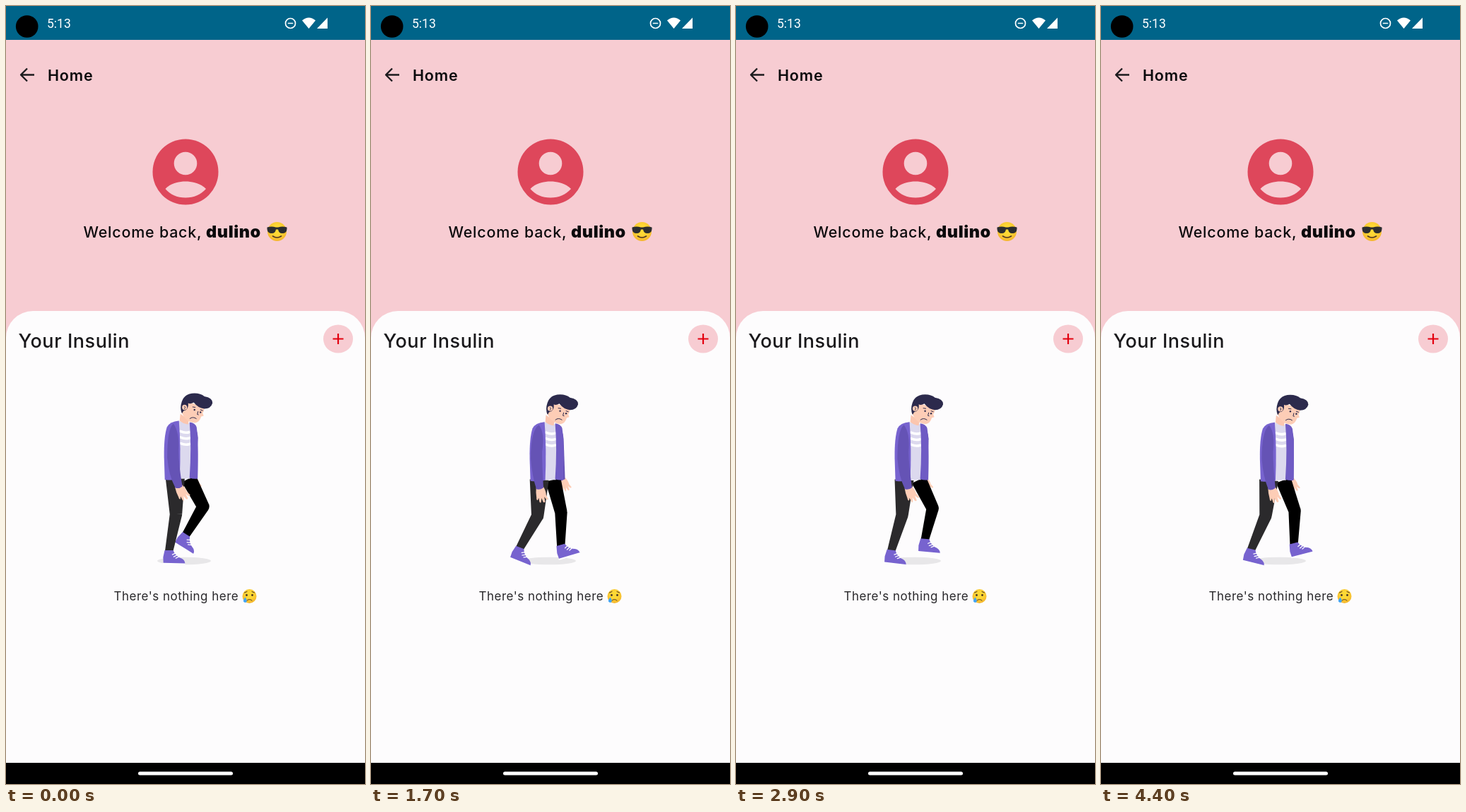
An HTML page that plays this animation: 508x1102 px, repeating every 4.5 s.

```html
<!DOCTYPE html>
<html lang="en">
<head>
<meta charset="utf-8">
<title>Home</title>
<style>
  html, body { margin: 0; width: 100%; height: 100%; overflow: hidden; background: #fdfcfd; }
  svg { display: block; width: 100vw; height: 100vh; }
  text { font-family: Inter, "Open Sans", sans-serif; fill: #0b0a0c; }
  .skin { fill: #fdcdb6; }
  .line { fill: none; stroke-linecap: round; stroke-linejoin: round; }
</style>
</head>
<body>
<svg viewBox="0 0 508 1102">
  <defs>
    <radialGradient id="face" cx=".5" cy=".4" r=".6">
      <stop offset=".4" stop-color="#fdd835"/>
      <stop offset="1" stop-color="#f5b52e"/>
    </radialGradient>
    <g id="shoe">
      <path fill="#7763cf" d="M-6-2H6Q9 5 15 8Q22 10 23 15V17H-7.5L-8 8Z"/>
      <path class="line" stroke="#fff" stroke-width="2" d="M-7.5 17H22.5"/>
      <path class="line" stroke="#fff" stroke-width="1.3" d="M5 4L9 2M7 7L11 5M10 9L14 7"/>
    </g>
    <path id="hand" class="skin" d="M-5-2H5Q8 6 7 11L9 17Q8 19 6 17L4 13L4 20Q2 22 1 19L0 14L-2 20Q-4 21-4 18L-4 13L-6 16Q-8 16-7 12Q-7 5-5-2Z"/>
  </defs>

  <!-- status bar -->
  <rect width="508" height="48" fill="#006489"/>
  <circle cx="29.7" cy="29" r="15.8"/>
  <text x="58" y="31" style="font:17.5px Roboto,sans-serif;fill:#fff">5:13</text>
  <g fill="#fff">
    <path class="line" stroke="#fff" stroke-width="1.7" d="M395.5 24.5a7 7 0 1 0 14 0a7 7 0 1 0-14 0M399.5 24.5H405.5"/>
    <path d="M428.5 32L419 20.5Q428.5 12.5 438 20.5ZM440 32H455V16.5Z"/>
  </g>

  <!-- header -->
  <rect y="48" width="508" height="425" fill="#f7ccd2"/>
  <path class="line" stroke="#1c1a1d" stroke-width="2.3" style="stroke-linecap:butt" d="M40 97.5H21.5M30 88.5L21 97.5L30 106.5"/>
  <text x="59" y="106" font-size="21.5" font-weight="600" letter-spacing=".8">Home</text>
  <circle cx="254" cy="235" r="46.5" fill="#de475b"/>
  <g fill="#f7ccd2">
    <circle cx="254" cy="223" r="16.3"/>
    <path d="M225.5 259C233 251 244 248.5 254 248.5S275 251 283 259C276 267 266 271.5 254 271.5S232 267 225.5 259Z"/>
  </g>
  <text x="109.5" y="328" font-size="21.5" font-weight="550" letter-spacing=".75">Welcome back,</text>
  <text x="283" y="328" font-size="23.5" font-weight="900" letter-spacing=".6">dulino</text>
  <g>
    <circle cx="383.5" cy="319.5" r="13.5" fill="url(#face)"/>
    <path fill="#2b2d30" d="M369.5 313.5Q376 311.5 382 313.5H385Q391 311.5 397.5 313.5V316Q397 322 391 322Q386 322 385 316.5H382Q381 322 376 322Q370 322 369.5 316Z"/>
    <path class="line" stroke="#4b3425" stroke-width="1.6" d="M377.5 326Q383.5 330 389.5 326"/>
  </g>

  <!-- sheet -->
  <path fill="#fdfcfd" d="M0 1072V470A38 38 0 0 1 38 432H470A38 38 0 0 1 508 470V1072Z"/>
  <text x="17.5" y="484" font-size="27" font-weight="500" letter-spacing=".55" style="fill:#19181b">Your Insulin</text>
  <ellipse cx="470" cy="471.5" rx="21" ry="20" fill="#f7ccd2"/>
  <path stroke="#e3000f" stroke-width="2.2" d="M462.5 471.5H477.5M470 464V479"/>
  <text x="152.5" y="842" font-size="17" letter-spacing=".5" style="fill:#29282b">There's nothing here</text>
  <g>
    <circle cx="344.5" cy="836" r="10" fill="url(#face)"/>
    <path class="line" stroke="#4b3425" stroke-width="1" d="M341 842Q344.5 839 348 842M337.5 831L341 829.5M348 829.5L351.5 831"/>
    <circle cx="340.5" cy="834.5" r="1.4" fill="#4b3425"/>
    <circle cx="348.5" cy="834.5" r="1.4" fill="#4b3425"/>
    <path fill="#42a5f5" d="M338.5 837.5Q341.5 842 340.5 844Q338 846 336 843.5Q335.5 841 338.5 837.5Z"/>
  </g>

  <!-- walker -->
  <ellipse cx="252" cy="786" rx="38" ry="5.3" fill="#e8e7e9"/>
  <g id="farArm">
    <use id="farHand" href="#hand"/>
    <path id="farSleeve" fill="#6553b5"/>
  </g>
  <path id="farLeg" fill="#000"/>
  <use id="farShoe" href="#shoe"/>
  <path id="nearLeg" fill="#2b2a2c"/>
  <use id="nearShoe" href="#shoe"/>
  <g id="body">
    <path fill="#dcd9ee" d="M243 588L263 592L261 670H245Z"/>
    <path class="line" stroke="#fff" stroke-width="3.6" d="M247 603Q254 606 260 604M247 611.5Q254 614.5 260 612.5M247 620Q254 623 260 621"/>
    <path fill="#7763cf" d="M245 588Q232 589 228 597Q223.5 611 224 640L225 671.5Q236 673 246 670.5Q248 625 245 588Z"/>
    <path fill="#6f5bc4" d="M260 590Q268 591 270 597Q273 618 271.5 670Q266 671 260 669Q263 625 260 590Z"/>
    <use id="nearHand" href="#hand"/>
    <path id="nearSleeve" fill="#6553b5"/>
    <path fill="#fbc6af" d="M247 578L259 587L258 593Q252 593 246 588Z"/>
    <path class="skin" d="M252 560L281 568Q281 574 278.5 577L280 581L276.5 582Q274 590 268 591Q257 590 252 582L248 575Z"/>
    <path fill="#2c2a4c" d="M249 577Q246 570 249 561Q253 549 267 549Q276 549 281 553.5Q292.5 555 292.5 563Q290 571 281 571Q272 570 266 562Q261 565 258 563Q259 570 254.5 573Q251 573 250 577Z"/>
    <circle class="skin" cx="253" cy="569" r="3.6"/>
    <path class="line" stroke="#2c2a4c" d="M253 567.5Q255 569 253 571M264.5 568.5L268 569M275.5 572.5L278.5 573.5M272 575L271 579L272.5 579.5M260.5 585Q264.5 581.5 269.5 585"/>
    <circle cx="267" cy="572.5" r="1.2" fill="#2c2a4c"/>
    <circle cx="275.5" cy="576" r="1.2" fill="#2c2a4c"/>
  </g>

  <!-- navigation bar -->
  <rect y="1072" width="508" height="30"/>
  <rect x="187" y="1084.5" width="134" height="5" rx="2.5" fill="#fff"/>
</svg>
<script>
const LOOP = 4500, STEP = 100, TAU = Math.PI * 2;
const el = id => document.getElementById(id);
const set = (id, name, value) => el(id).setAttribute(name, value);

// stride phase, knee x y, ankle x y, shoe angle
const nearKeys = [
  [.115, 256, 722, 260, 771, -7],
  [.18, 250.5, 722, 251, 772, -3],
  [.32, 240.5, 720, 230.5, 773, 1],
  [.48, 233, 722, 212, 771, 14],
  [.69, 247.5, 722, 211, 762, 42],
  [.75, 250, 722, 216, 761, 45],
  [.83, 261, 719, 232, 761, 26],
  [.98, 268, 718, 269, 766, -18]
];
const farKeys = [
  [.115, 258.5, 718, 222, 751, 48],
  [.18, 266.5, 716, 230, 747, 52],
  [.32, 279, 709, 254, 750, 32],
  [.48, 274, 715, 273, 763, -15],
  [.69, 254, 722, 247, 768, -4],
  [.75, 251, 722, 239, 768, -1],
  [.83, 243, 722, 231, 768, 4],
  [.98, 250, 722, 221, 764, 22]
];

// smooth periodic curve through the keys
function pose(keys, p) {
  const n = keys.length;
  const at = j => keys[(j + n) % n];
  const time = j => at(j)[0] + Math.floor(j / n);
  let i = keys.findIndex(k => k[0] > p);
  if (i < 0) i = n;
  const [t0, t1, t2, t3] = [-2, -1, 0, 1].map(j => time(i + j));
  const span = t2 - t1, u = (p - t1) / span;
  return [1, 2, 3, 4, 5].map(c => {
    const [a, b, d, e] = [-2, -1, 0, 1].map(j => at(i + j)[c]);
    const m1 = (d - a) / (t2 - t0) * span, m2 = (e - b) / (t3 - t1) * span;
    return b + u * (m1 + u * (3 * (d - b) - 2 * m1 - m2 + u * (2 * (b - d) + m1 + m2)));
  });
}

function segment(x1, y1, r1, x2, y2, r2) {
  const len = Math.hypot(x2 - x1, y2 - y1);
  const nx = (y1 - y2) / len, ny = (x2 - x1) / len;
  return `M${x1 + nx * r1} ${y1 + ny * r1}L${x2 + nx * r2} ${y2 + ny * r2}` +
    `L${x2 - nx * r2} ${y2 - ny * r2}L${x1 - nx * r1} ${y1 - ny * r1}Z`;
}

function drawLeg(side, keys, phase, hipAt, hipY, hipR) {
  const [kx, ky, ax, ay, turn] = pose(keys, phase);
  const r = 8.7, hipX = hipAt(kx);
  set(side + 'Leg', 'd', segment(hipX, hipY, hipR, kx, ky, r) + segment(kx, ky, r, ax, ay, 5.6) +
    `M${kx - r} ${ky}a${r} ${r} 0 1 0 ${2 * r} 0a${r} ${r} 0 1 0 ${-2 * r} 0Z`);
  set(side + 'Shoe', 'transform', `translate(${ax} ${ay}) rotate(${turn})`);
}

function draw(ms) {
  const phase = (.32 + ms * .000718) % 1;
  const bob = -1.8 * Math.cos(2 * TAU * (phase - .22));
  const swing = Math.cos(TAU * (phase - .29));
  const shift = `translate(${bob * .5} ${bob})`;
  set('body', 'transform', shift);
  set('farArm', 'transform', shift);

  drawLeg('far', farKeys, phase, x => 256.5 + .1 * (x - 257), 670 + bob, 11);
  drawLeg('near', nearKeys, phase, x => 240.5 + .25 * (x - 245), 670 + bob, 13.5);

  const wrist = 238.5 + 6.5 * swing, elbow = 227.5 + 3 * swing;
  set('nearSleeve', 'd', `M237 592Q${elbow - 2} 600 ${elbow - 2} 640Q${elbow} 665 ${wrist - 5} 683` +
    `Q${wrist} 685 ${wrist + 5} 681Q${elbow + 14} 650 ${elbow + 14} 630Q246 604 237 592Z`);
  set('nearHand', 'transform', `translate(${wrist} 682) rotate(${-10 - 18 * swing})`);

  const farWrist = 271 - 6 * swing;
  set('farSleeve', 'd', `M264 594Q271 598 272 612L${farWrist + 3} 669L${farWrist - 5} 672Z`);
  set('farHand', 'transform', `translate(${farWrist} 670) rotate(-22) scale(.82)`);
}

function tick() {
  draw(Math.floor(performance.now() % LOOP / STEP) * STEP);
  requestAnimationFrame(tick);
}
tick();
</script>
</body>
</html>
```
